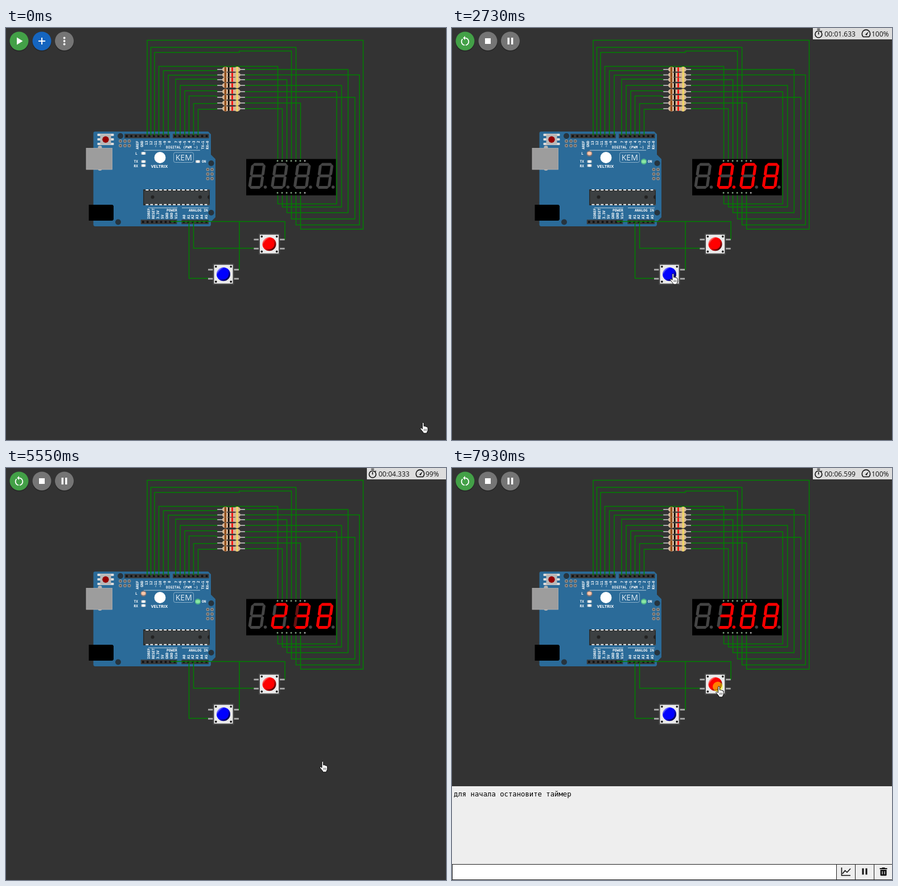
Write an HTML page that moves like this. It is 773 px wide and 725 px high and loops after 8 s.

```html
<!DOCTYPE html>
<html lang="ru">
<head>
<meta charset="utf-8">
<title>Timer circuit</title>
<style>
html, body { margin: 0; width: 100%; height: 100%; overflow: hidden; background: #333; }
svg { display: block; }
.ui { font-family: "Open Sans", sans-serif; }
.silk { font: bold 6.25px "DejaVu Sans Mono", monospace; fill: #fff; }
</style>
</head>
<body>
<svg id="stage" width="773" height="725" viewBox="0 0 773 725"></svg>
<script>
const PERIOD = 8000, MM = 3.127, PITCH = 2.54 * MM;
const range = n => [...Array(n).keys()];
const each = (list, draw) => list.map(draw).join('');
const rect = (x, y, w, h, fill, more = '') => `<rect x="${x}" y="${y}" width="${w}" height="${h}" fill="${fill}" ${more}/>`;
const circle = (x, y, r, fill, more = '') => `<circle cx="${x}" cy="${y}" r="${r}" fill="${fill}" ${more}/>`;
const path = (d, fill, more = '') => `<path d="${d}" fill="${fill}" ${more}/>`;
const line = (d, stroke, width, more = '') => path(d, 'none', `stroke="${stroke}" stroke-width="${width}" ${more}`);
const inMillimetres = (x, y, content) => `<g transform="translate(${x} ${y}) scale(${MM})">${content}</g>`;
const silk = (x, y, s, more = '') => `<text class="silk" x="${x}" y="${y}" ${more}>${s}</text>`;
const upright = (x, y, s, anchor) => silk(0, 0, s, `transform="translate(${x} ${y}) rotate(-90)" text-anchor="${anchor}"`);

// ---- wiring -------------------------------------------------------------
const ROWS = [73, 82.5, 91, 101, 112, 122, 132, 142];
const wireList = [
  'M248 189V21.5H627.5V354H517.5V290', 'M254.5 189V34H509.5V234',
  'M261 189V43H410V40.5H501.5V234', 'M268.5 189V67.5H477.5V234',
  'M418 73H601V325H493.5V290', 'M418 82.5H621V346.5H509.5V290',
  'M418 91H493.5V234', 'M418 101H589.5V315H485.5V290',
  'M418 112H581V309.5H477.5V290', 'M418 122H613V336H501.5V290',
  'M418 132H517.5V234', 'M418 142H485.5V234',
  'M289 340.5H490V372H487', 'M410 340.5V425H407',
  'M321.5 342V440.5H357', 'M329.5 342V387.5H437',
  ...[[276.5, 75], [285, 83], [298, 90], [306, 101], [314, 110.5], [321.5, 119.5], [329.5, 133], [337.5, 143]]
    .map(([x, y], i) => `M${x} 189V${y}H368L372 ${ROWS[i]}`)
];
const wires = () => each(wireList, d => line(d, '#008000', 1.5, 'stroke-linejoin="round"'));

const RESISTOR_BODY = 'M4.69 0C3.63 0 2.77.67 2.77 1.5S3.63 3 4.69 3Q5.3 3 5.82 2.7H9.92Q10.4 3 11.05 3C12.11 3 12.97 2.33 12.97 1.5S12.11 0 11.05 0Q10.4 0 9.92.3H5.82Q5.3 0 4.69 0Z';
const resistor = y => inMillimetres(371.2, y - 4.7, rect(0, 1.18, 15.56, .64, '#aaa')
  + path(RESISTOR_BODY, '#d5b597') + rect(4, 0.05, 1, 2.9, '#8f4814') + rect(6, .3, .8, 2.4, '#000')
  + rect(8, .3, .8, 2.4, '#fb0000') + rect(10.69, 0, 1, 3, '#f1d863'));

// ---- controller board ---------------------------------------------------
const header = (x, y, pins) => rect(x, y, pins * PITCH, 7.9, '#38393b')
  + each(range(pins), i => rect(x + 2.2 + i * PITCH, y + 2.2, 3.6, 3.6, '#111'));
const pads = (xs, ys) => each(xs, x => each(ys, y =>
  circle(x, y, 3, '#8c8c8c') + circle(x, y, 1.3, '#554f4a')));
const led = (x, y) => rect(x - 4, y - 2.2, 8, 4.4, '#c6c6c6') + rect(x - 2.2, y - 2.2, 4.4, 4.4, '#fff');

function board() {
  const outline = 'M.999 0a1 1 0 0 0-.999 .999v51.34a1 1 0 0 0 .999 .999h64.04a1 1 0 0 0 .999-.999v-1.54l2.539-2.539v-32.766l-2.539-2.539v-11.43l-1.524-1.523z';
  return inMillimetres(153.5, 182.2, path(outline, '#2b6b99'))
    + each([[201, 190], [360.5, 238], [360.5, 325], [197, 341.5]], ([x, y]) => circle(x, y, 5, '#27343e'))
    + rect(161.5, 207, 7, 44, '#b3b2b2', 'rx="3"') + rect(141, 211.5, 45.5, 37.5, '#9d9d9d', 'stroke="#b3b2b2" stroke-width=".8"')
    + path('M145.5 311H187L189 313V337L187 339H145.5Z', '#000')
    + each([188, 196, 204], y => rect(160.5, y - 2, 29, 4, '#ddd', 'rx="1"'))
    + rect(165.5, 186.5, 19, 19, '#b8b8b8') + circle(175, 196.3, 5.7, '#960000')
    + pads([201, 209, 216.5], [199, 207]) + pads([354.5, 362], [249, 257, 265])
    + header(208.2, 186.2, 10) + header(293, 186.2, 8) + header(236.8, 337.3, 8) + header(308.3, 337.3, 6)
    + each(['AREF', 'GND', '13', '12', '~11', '~10', '~9', '8'], (s, i) => upright(233 + i * PITCH, 198.5, s, 'end'))
    + each(['7', '~6', '~5', '4', '~3', '2', 'TX→1', 'RX←0'], (s, i) => upright(300.5 + i * PITCH, 198.5, s, 'end'))
    + each(['IOREF', 'RESET', '3.3V', '5V', 'GND', 'GND', 'Vin'], (s, i) => upright(253.3 + i * PITCH, 336, s, 'start'))
    + each(range(6), i => upright(314.6 + i * PITCH, 336, 'A' + i, 'start'))
    + silk(281, 212, 'DIGITAL (PWM ~)') + silk(282, 323, 'POWER') + silk(321, 323, 'ANALOG IN')
    + line('M242 215.2H341M250 316.5H301M309 316.5H356', '#d5e2eb', .8)
    + silk(227, 222.5, 'L') + silk(224.5, 237.3, 'TX') + silk(224.5, 244.5, 'RX') + silk(344, 237.3, 'ON')
    + led(241.5, 220.5) + led(241.5, 235) + led(241.5, 242) + led(337, 235)
    + circle(270.5, 228, 10, '#fff')
    + '<text class="ui" x="269.5" y="246" font-size="7.4" font-weight="700" fill="#fff" text-anchor="middle">VELTRIX</text>'
    + rect(294.5, 219, 35, 17.5, 'none', 'rx="3" stroke="#9fbfd5" stroke-width=".8"')
    + '<text class="ui" x="312.3" y="233" font-size="14" fill="#e4eef5" text-anchor="middle">KEM</text>'
    + rect(241, 284, 117, 28, '#292c2d') + rect(242.5, 286.5, 114, 23, '#3c4042')
    + line('M245.4 285H357M245.4 310.8H357', '#eee', 2, `stroke-dasharray="5 ${PITCH - 5}"`)
    + circle(257.5, 297.5, 3, '#222') + circle(341, 297.5, 3, '#222') + path('M357.5 294a3.5 3.5 0 0 0 0 7z', '#222');
}

// ---- parts --------------------------------------------------------------
const SEGMENTS = {
  a: '2 0 8 0 9 1 8 2 2 2 1 1', b: '10 2 10 8 9 9 8 8 8 2 9 1', c: '10 10 10 16 9 17 8 16 8 10 9 9',
  d: '8 18 2 18 1 17 2 16 8 16 9 17', e: '0 16 0 10 1 9 2 10 2 16 1 17', f: '0 8 0 2 1 1 2 2 2 8 1 9',
  g: '2 8 8 8 9 9 8 10 2 10 1 9'
};
const DIGITS = ['abcdef', 'bc', 'abdeg', 'abcdg', 'bcfg', 'acdfg', 'acdefg', 'abc', 'abcdefg', 'abcdfg'];
const digit = i => {
  const x = 3.2 + i * 12.7;
  return `<g transform="skewX(-8) translate(${x} 2.4) scale(.81)">`
    + each(Object.entries(SEGMENTS), ([k, p]) => `<polygon id="s${i}${k}" points="${p}" fill="#444"/>`) + '</g>'
    + circle(x + 7.4, 16, .89, '#444', `id="dot${i}"`);
};
const display = () => rect(422, 230.5, 157.5, 64, '#000')
  + each([233.7, 290], y => each(range(7), i => circle(477 + i * 8, y, 1.5, i < 6 ? '#7f9f7f' : '#aaa')))
  + inMillimetres(422.4, 230, each(range(4), digit));

const button = (x, y, color) => each([-8, 8], dy =>
    line(`M${x - 27} ${y + dy}H${x + 27}`, '#999', 3) + line(`M${x - 27} ${y + dy}H${x + 27}`, '#bbb', 1))
  + rect(x - 18.7, y - 18.7, 37.4, 37.4, '#464646', 'rx="1.5"') + rect(x - 16.5, y - 16.5, 33, 33, '#eaeaea')
  + each([-13.2, 13.2], dx => each([-13.2, 13.2], dy => circle(x + dx, y + dy, 1.8, '#111')))
  + `<linearGradient id="cap-${color}" x2="1" y2="1"><stop stop-color="#fff"/><stop offset=".3" stop-color="${color}"/>`
  + `<stop offset=".5" stop-color="${color}"/><stop offset="1"/></linearGradient>`
  + circle(x, y, 12, `url(#cap-${color})`)
  + circle(x, y, 9.1, color, 'stroke="#2f2f2f" stroke-opacity=".47" stroke-width=".25"');

const RESTART = 'M12 5V2L8 6l4 4V7c3.31 0 6 2.69 6 6 0 2.97-2.17 5.43-5 5.91v2.02c3.95-.49 7-3.85 7-7.93 0-4.42-3.58-8-8-8zm-6 8c0-1.65.67-3.15 1.76-4.24L6.34 7.34C4.9 8.79 4 10.79 4 13c0 4.08 3.05 7.44 7 7.93v-2.02c-2.83-.48-5-2.94-5-5.91z';
const round = (x, fill, id) => circle(x, 24.5, 16.8, '#000', 'opacity=".25"') + circle(x, 23, 16.5, fill, id);
const toolbar = () => round(23, '#43a047', 'id="runButton"') + round(63, '#1565c0', 'id="secondButton"') + round(102.5, '#757575')
  + '<g id="idleIcons">' + path('M19 16.5V29.5L29.5 23Z', '#fff') + line('M63 17V29M57 23H69', '#fff', 2)
  + each([17.5, 23, 28.5], y => circle(102.5, y, 1.9, '#fff')) + '</g>'
  + '<g id="runIcons">' + path(RESTART, '#fff', 'transform="translate(12.2 12.2) scale(.9)"')
  + rect(58, 18, 10, 10, '#fff') + rect(97.5, 17, 3.4, 12, '#fff') + rect(104, 17, 3.4, 12, '#fff') + '</g>';

const stats = () => '<g id="stats" class="ui" font-size="12" fill="#111">' + rect(634, 0, 139, 20, '#ddd')
  + circle(644, 11, 6, 'none', 'stroke="#111" stroke-width="1.6"') + line('M641.5 2H646.5M644 7V11.5M648.8 5L650 6.2', '#111', 1.5)
  + '<text id="clock" x="654.5" y="14.7"></text>'
  + line('M722.5 15.5A7.2 7.2 0 1 1 732.5 15.5Z', '#111', 1.6, 'stroke-linejoin="round"') + path('M726 11.5L732 6L728.5 13Z', '#111')
  + '<text id="speed" x="737" y="14.7"></text></g>';

const serial = () => '<g id="serial">' + rect(0, 560, 773, 165, '#eee')
  + '<text x="3" y="578" font-family="DejaVu Sans Mono, monospace" font-size="12.25" fill="#000">для начала остановите таймер</text>'
  + rect(0, 698, 675, 26.5, '#fff') + line('M0 697.5H773M0 724.5H773M.5 698V725M675.5 698V725M708.5 698V725M741.5 698V725', '#222', 1)
  + line('M684.5 703V717H700M686 714L690.5 708.5L694 711.5L700 705', '#111', 1.6)
  + rect(720.5, 704.5, 3, 11, '#111') + rect(726.5, 704.5, 3, 11, '#111')
  + path('M751.5 704H755L756 703H760L761 704H764.5V706H751.5ZM752.5 707H763.5V716Q763.5 717.5 762 717.5H754Q752.5 717.5 752.5 716Z', '#111')
  + line('M756 709.5V715M760 709.5V715', '#eee', 1.2) + '</g>';

const tooltip = () => '<g id="tooltip">' + rect(-30, 51, 106, 21, '#616161', 'rx="3"')
  + '<text class="ui" x="23.5" y="64.3" font-size="10" font-weight="600" fill="#fff" text-anchor="middle">Start the simulation</text></g>';
const hand = () => '<g id="hand">' + path('M4 1.6Q4 .2 5.3 .2Q6.6 .2 6.6 1.6V6.8Q9 6.1 10 7.4Q13 7.3 13.6 9.8V14Q13.2 16 12 17.3V19H5.5V17.5Q3 14.5 .5 11.5Q0 9.4 2 9.7L4 11.5Z',
  '#fff', 'stroke="#000" stroke-width=".9" stroke-linejoin="round"') + line('M7 15V11.5M9 15V11.5M11 15V11.5', '#000', .6) + '</g>';

document.getElementById('stage').innerHTML = board() + wires() + each(ROWS, resistor) + display()
  + button(462.5, 380.2, 'red') + button(382, 433.2, 'blue')
  + '<g id="powered">' + circle(241.5, 221, 5.2, '#ff8040', 'opacity=".38"') + circle(241.5, 220.8, 3.4, '#ffc8a8', 'opacity=".7"')
  + circle(337, 235, 5.2, '#60e080', 'opacity=".6"') + circle(337, 235, 3.2, '#80e8a0', 'opacity=".7"') + '</g>'
  + circle(241.5, 235, 4, '#ffe060', 'id="tx" opacity=".7"')
  + toolbar() + tooltip() + stats() + serial() + circle(0, 0, 9, '#ff0', 'id="click" opacity=".5"') + hand();

// ---- motion -------------------------------------------------------------
const CURSOR = [[0, 727.5, 694], [120, 727.5, 694], [760, 18, 16], [1040, 18, 20], [1130, 22, 62], [1680, 272, 363],
  [2400, 383, 432], [2800, 383, 432], [3250, 550, 521], [3600, 542, 514], [4080, 542, 514], [4220, 551, 516],
  [5600, 551, 516], [5900, 467, 388], [6100, 463.5, 384], [8000, 463.5, 384]];
const SIM_TICKS = [[1060, 0], [1130, 4], [2730, 98], [4080, 176], [5550, 260], [6530, 316], [7930, 396], [8000, 400]];
const COUNTER = [[0, 0], [1.55, 0], [2.933, 1.04], [4.333, 2.32], [5.266, 2.84], [6.599, 3.85], [7, 4.15]];
const CLICKS = [[1000, 1070], [2520, 2660], [6470, 6740], [7860, 8000]];

function track(keys, t, ease = k => k) {
  const i = Math.max(0, keys.findLastIndex(key => key[0] <= t));
  const from = keys[i], to = keys[i + 1] || from;
  const k = to === from ? 0 : ease(Math.min(1, Math.max(0, (t - from[0]) / (to[0] - from[0]))));
  return from.slice(1).map((v, j) => v + (to[j + 1] - v) * k);
}
const within = (t, a, b) => t >= a && t < b;
const $ = id => document.getElementById(id);
const show = (id, on) => $(id).style.display = on ? '' : 'none';
const set = (id, name, value) => $(id).setAttribute(name, value);

function drawCounter(value, running) {
  const shown = [-1, Math.floor(value), Math.floor(value * 10 + 1e-6) % 10, value > 0 ? 8 : 0];
  const fading = value > .1 && shown[2] < 5;
  shown.forEach((number, i) => {
    for (const k in SEGMENTS) {
      const lit = running && number >= 0 && DIGITS[number].includes(k);
      const dim = i === 2 && fading && 'ef'.includes(k);
      set(`s${i}${k}`, 'fill', dim ? '#651010' : lit ? '#f00' : '#444');
    }
  });
  set('dot1', 'fill', running ? '#f00' : '#444');
}

function render(t) {
  const running = t >= 1060;
  const key = SIM_TICKS.findLast(k => k[0] <= t) || [0];
  const heldTime = key[0] + Math.floor((t - key[0]) / 70) * 70;
  const ticks = running ? Math.round(track(SIM_TICKS, heldTime)[0]) : 0;
  const ms = Math.floor(ticks * 16.6666);

  for (const id of ['powered', 'runIcons', 'stats']) show(id, running);
  show('idleIcons', !running);
  show('tooltip', within(t, 800, 1340));
  show('serial', t >= 6600);
  show('tx', within(t, 6600, 6880));
  set('runButton', 'fill', within(t, 700, 1120) ? '#56aa5a' : '#43a047');
  set('secondButton', 'fill', running ? '#757575' : '#1565c0');

  $('clock').textContent = `00:${String(Math.floor(ms / 1000)).padStart(2, '0')}.${String(ms % 1000).padStart(3, '0')}`;
  $('speed').textContent = (ticks < 12 ? 0 : ticks < 110 || ticks > 380 ? 100 : 99) + '%';
  drawCounter(track(COUNTER, ms / 1000 + .0005)[0], running);

  const [x, y] = track(CURSOR, t, k => k * k * (3 - 2 * k));
  set('hand', 'transform', `translate(${x} ${y})`);
  set('click', 'transform', `translate(${x + 3.5} ${y + 1})`);
  show('click', CLICKS.some(([a, b]) => within(t, a, b)));
}

const start = performance.now();
function loop() {
  render((performance.now() - start) % PERIOD);
  requestAnimationFrame(loop);
}
loop();
</script>
</body>
</html>
```
